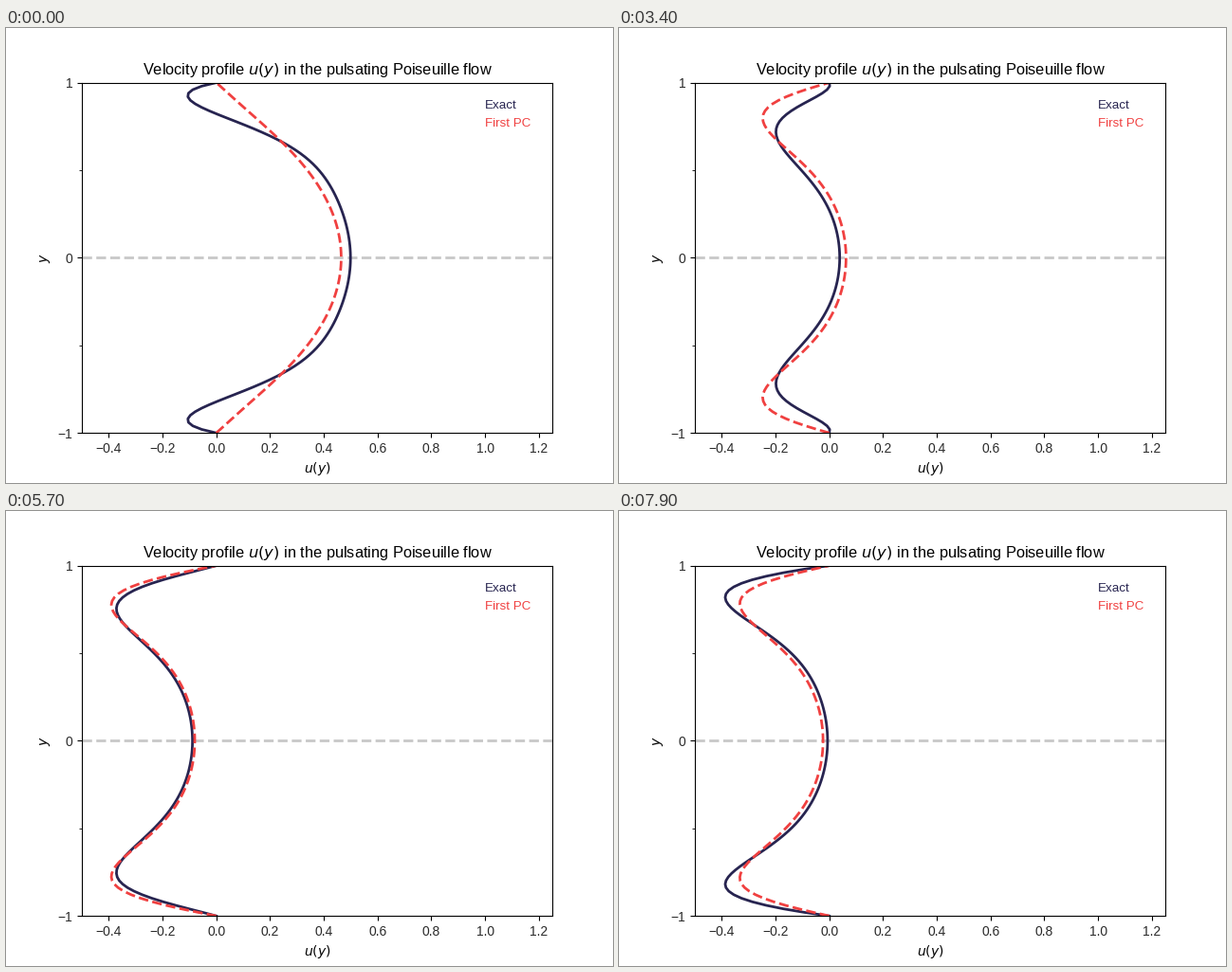
Recreate the animation shown at these times as a matplotlib script. Size 640 px wide and 480 px high, loop 8 s.

```python
import numpy as np
import matplotlib.pyplot as plt
from matplotlib.animation import FuncAnimation
from matplotlib.ticker import MultipleLocator

plt.rcParams["font.family"] = "Liberation Sans"
plt.rcParams["mathtext.fontset"] = "dejavusans"

NAVY, RED, GREY, INK = "#272450", "#f04040", "#c8c8c8", "#2a2a2a"
FRAMES, PERIOD = 80, 25   # frames in the loop, frames per pulsation
W, PA = 10, 60            # Womersley number, pressure amplitude

# Pulsating channel flow: parabola plus an oscillating Stokes layer
y = np.linspace(-1, 1, 100)
mean = 0.5 * (1 - y**2)
k = W * np.sqrt(1j)
shape = 1j * PA / W**2 * (1 - np.cosh(k * y) / np.cosh(k))
phase = 2 * np.pi * np.arange(4 * PERIOD) / PERIOD
pulse = np.real(np.exp(1j * phase)[:, None] * shape)

# Projection of the pulsation on its first principal component
mode = np.linalg.svd(pulse, full_matrices=False)[2][0]
exact = mean + pulse
first = mean + np.outer(pulse @ mode, mode)

fig, ax = plt.subplots(figsize=(6.4, 4.8), dpi=100)
ax.set_xlim(-0.5, 1.25)
ax.set_ylim(-1, 1)
ax.xaxis.set_major_locator(MultipleLocator(0.2))
ax.set_yticks([-1, 0, 1], ["\u22121", "0", "1"])
ax.set_yticks([-0.5, 0.5], minor=True)
ax.tick_params(labelcolor=INK)
ax.set_title("Velocity profile $u(y)$ in the pulsating Poiseuille flow", size=11.8)
ax.set_xlabel("$u(y)$")
ax.set_ylabel("$y$")

ax.axhline(0, color=GREY, lw=2, ls="--", zorder=1)
exact_line, = ax.plot(exact[0], y, color=NAVY, lw=2)
first_line, = ax.plot(first[0], y, color=RED, lw=2, ls="--")
ax.text(1, 0.85, "Exact", color=NAVY, size=9.6)
ax.text(1, 0.75, "First PC", color=RED, size=9.6)


def update(i):
    exact_line.set_xdata(exact[i])
    first_line.set_xdata(first[i])
    return exact_line, first_line


anim = FuncAnimation(fig, update, frames=FRAMES, interval=100,
                     repeat=True, repeat_delay=0)
plt.show()
```
